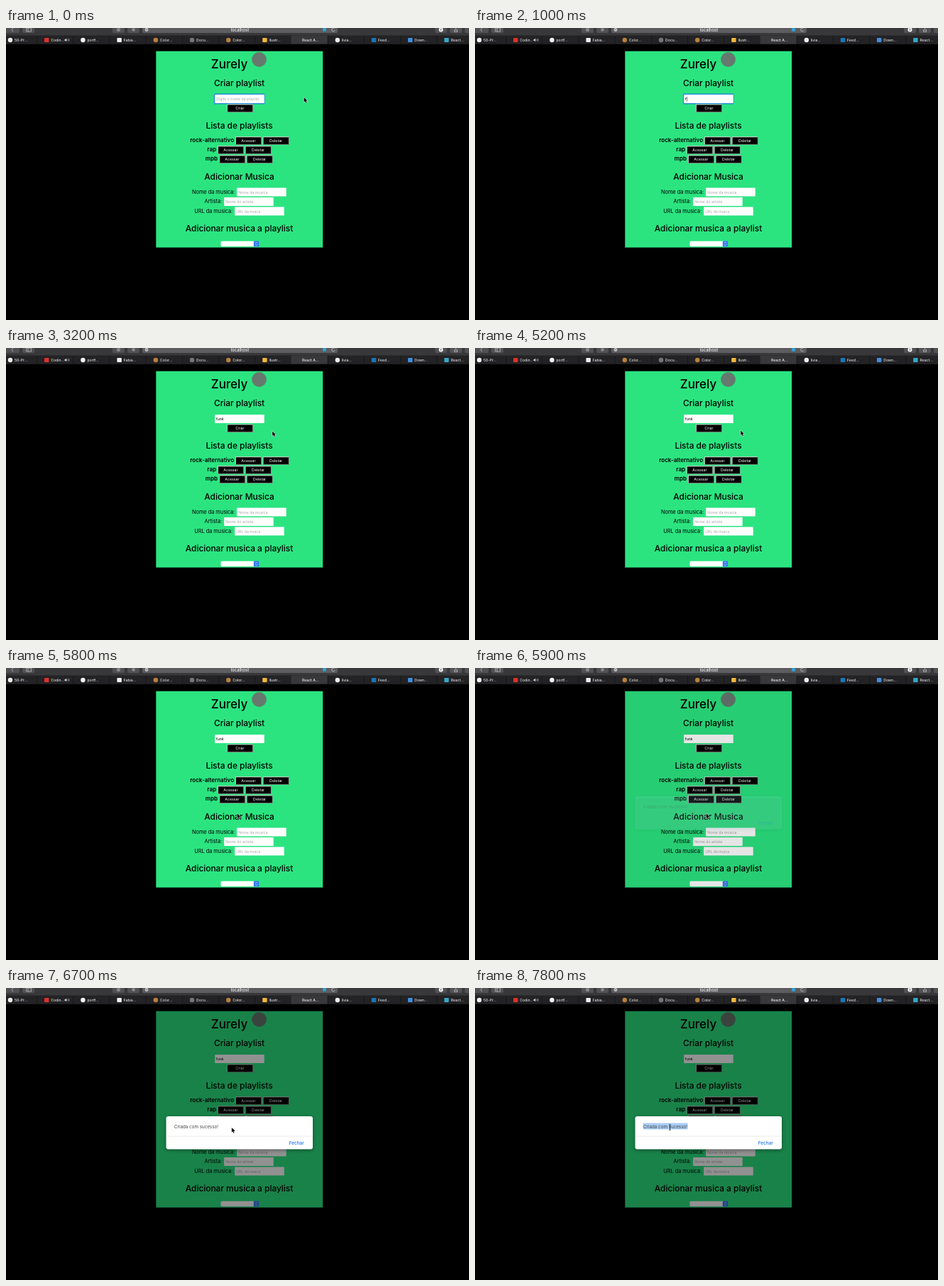
Animation of 652 by 412 pixels, one loop 8 s. Source, as an HTML page with a canvas:

```html
<!DOCTYPE html>
<html lang="pt">
<head>
<meta charset="utf-8">
<title>Playlists</title>
<style>
html, body { margin: 0; width: 100%; height: 100%; overflow: hidden; background: #000; }
canvas { display: block; width: 652px; height: 412px; }
</style>
</head>
<body>
<canvas id="stage"></canvas>
<script>
const W = 652, H = 412, LOOP = 8000, STEP = 100;
const MID = 328.5;
const TAB_W = 51.2;
const FONT = 'Inter, "Liberation Sans", sans-serif';
const canvas = document.getElementById('stage');
const ctx = canvas.getContext('2d');
const dpr = window.devicePixelRatio || 1;
canvas.width = W * dpr;
canvas.height = H * dpr;

function rect(x, y, w, h, color) {
  ctx.fillStyle = color;
  ctx.fillRect(x, y, w, h);
}

function round(x, y, w, h, r, color) {
  ctx.fillStyle = color;
  ctx.beginPath();
  ctx.roundRect(x, y, w, h, r);
  ctx.fill();
}

function disc(x, y, r, color) {
  ctx.fillStyle = color;
  ctx.beginPath();
  ctx.arc(x, y, r, 0, Math.PI * 2);
  ctx.fill();
}

function text(str, x, y, size, color = '#000', weight = 400, align = 'left') {
  ctx.font = `${weight} ${size}px ${FONT}`;
  ctx.textAlign = align;
  ctx.fillStyle = color;
  ctx.fillText(str, x, y);
}

function line(points, color, width = 0.8) {
  ctx.strokeStyle = color;
  ctx.lineWidth = width;
  ctx.beginPath();
  points.forEach(([x, y]) => ctx.lineTo(x, y));
  ctx.stroke();
}

// Interpolates through [time, x, y] keys, easing each leg.
function along(keys, t) {
  let i = 0;
  while (i < keys.length - 2 && t >= keys[i + 1][0]) i++;
  const [t0, x0, y0] = keys[i], [t1, x1, y1] = keys[i + 1];
  const p = Math.min(1, Math.max(0, (t - t0) / (t1 - t0)));
  const e = p * p * (3 - 2 * p);
  return [x0 + (x1 - x0) * e, y0 + (y1 - y0) * e];
}

// icon shape, icon colour, label
const tabs = [
  ['disc', '#f2f2f2', '50-Pr...'],
  ['square', '#e0302c', 'Codin...'],
  ['disc', '#f2f2f2', 'portf...'],
  ['square', '#f4f4f4', 'Fabia...'],
  ['disc', '#b8813f', 'Color...'],
  ['disc', '#77777a', 'Docu...'],
  ['disc', '#b8813f', 'Color...'],
  ['square', '#f3b83a', 'Ilustr...'],
  null,
  ['disc', '#f2f2f2', 'livia...'],
  ['square', '#1b77b8', 'Feed...'],
  ['square', '#3f8fe0', 'Down...'],
  ['square', '#37a9c9', 'React...']
];

function drawBrowser() {
  const icon = '#c4c4c6', key = '#525154';
  rect(0, 0, W, 11, '#38373a');
  round(-5, -4, 24, 11, 2, key);
  [23, 150, 171, 604, 625, 646].forEach(x => round(x, -4, 17, 11, 2, key));
  round(192, -4, 275, 11, 2, '#5d5c5f');

  line([[10, 0], [7.8, 2.5], [10, 5]], icon);
  ctx.strokeStyle = icon;
  ctx.lineWidth = 0.7;
  ctx.strokeRect(28.5, 0, 7, 5);
  line([[31, 0], [31, 5]], icon);
  disc(158.5, 2.5, 2.6, '#858487');
  disc(179.5, 2.5, 2.4, '#858487');
  disc(198, 2.5, 2.4, icon);
  line([[196.8, 2.5], [199.2, 2.5]], '#5d5c5f', 0.6);
  text('localhost', 329.5, 5, 5.8, '#f4f4f4', 500, 'center');
  round(446, 0, 5, 4.8, 1, '#2f9fd0');
  ctx.strokeStyle = icon;
  ctx.lineWidth = 0.8;
  ctx.beginPath();
  ctx.arc(460.8, 2.5, 2.2, 0.3, 5.4);
  ctx.stroke();
  disc(612.5, 2.4, 3, '#f0f0f0');
  line([[612.5, 0.8], [612.5, 3.9]], key);
  line([[631.5, 2], [631.5, 5.2], [635.5, 5.2], [635.5, 2]], icon);
  line([[633.5, 0], [633.5, 3.7]], icon);

  rect(0, 10.5, W, 12.5, '#232225');
  tabs.forEach((tab, i) => {
    const left = i * TAB_W - 8;
    if (!tab) {
      rect(left, 10.5, TAB_W, 12.5, '#38373a');
      text('React A...', 428.7, 18.8, 5.1, '#f0f0f0', 500, 'center');
      return;
    }
    const [shape, color, label] = tab;
    const x = left + 14;
    rect(left, 11, 0.6, 12, '#111');
    if (shape === 'disc') disc(x, 17, 3.2, color);
    else round(x - 3.2, 13.9, 6.4, 6.2, 0.8, color);
    text(label, x + 6, 18.8, 5.1, '#dedede', 500);
  });
  ctx.fillStyle = '#d0d0d0';
  ctx.beginPath();
  [[82.5, 15.9], [83.7, 15.9], [85.3, 14.5], [85.3, 19.3], [83.7, 17.9], [82.5, 17.9]]
    .forEach(p => ctx.lineTo(...p));
  ctx.fill();
  line([[86.8, 15.5], [87.2, 16.9], [86.8, 18.3]], '#d0d0d0', 0.6);
  line([[88.3, 14.8], [88.9, 16.9], [88.3, 19]], '#d0d0d0', 0.6);
  rect(0, 22.6, W, 0.7, '#111');
}

function button(label, x, y) {
  rect(x, y, 37, 11.5, '#7f9488');
  rect(x, y, 36.2, 10.7, '#e4ece7');
  rect(x + 0.8, y + 0.8, 35.4, 9.9, '#000');
  text(label, x + 18.4, y + 7.4, 5.3, '#fff', 400, 'center');
}

function field(x, y, hint) {
  rect(x, y, 69.5, 12, '#fff');
  if (hint) text(hint, x + 2, y + 8.3, 5.2, '#a6a6a6');
}

const heading = (str, y) => text(str, MID, y, 11.9, '#000', 500, 'center');

function drawPage(t) {
  rect(211.3, 32.7, 234.8, 277, '#2be480');
  text('Zurely', 314.5, 57, 17, '#000', 500, 'center');
  disc(356.5, 44.5, 10.4, '#66786f');

  heading('Criar playlist', 81.5);
  if (t < 2800) round(292.8, 92.5, 71.8, 14.9, 1.5, '#2b8fd8');
  const typed = t < 900 ? '' : 'funk'.slice(0, t < 1200 ? 1 : Math.floor((t - 1200) / 100) + 2);
  field(294.2, 94, typed ? '' : 'Digite o nome da playlist');
  if (typed) {
    text(typed, 295.8, 102.1, 5.2);
    if (t < 1900) rect(296.2 + ctx.measureText(typed).width, 97, 0.6, 6.4, '#222');
  }
  button('Criar', 311, 107.6);

  heading('Lista de playlists', 141.5);
  [['rock-alternativo', 323], ['rap', 298], ['mpb', 300]].forEach(([name, x], i) => {
    const y = 153.4 + i * 13.1;
    text(name, x - 2, y + 7.8, 8, '#000', 600, 'right');
    button('Acessar', x, y);
    button('Deletar', x + 38.7, y);
  });

  heading('Adicionar Musica', 213.7);
  [
    ['Nome da musica:', 325.2, 'Nome da musica'],
    ['Artista:', 307.2, 'Nome do artista'],
    ['URL da musica:', 322.2, 'URL da muica']
  ].forEach(([label, x, hint], i) => {
    const y = 225.5 + i * 13.5;
    text(label, x - 2.9, y + 8, 7.35, '#000', 400, 'right');
    field(x, y, hint);
  });

  heading('Adicionar musica a playlist', 286.8);
  round(302.5, 300.7, 53.5, 7.6, 1.5, '#fff');
  round(348.8, 300.5, 7.4, 8, 1.3, '#2f78f0');
  line([[351, 303.6], [352.5, 302.1], [354, 303.6]], '#fff', 0.7);
  line([[351, 305.4], [352.5, 306.9], [354, 305.4]], '#fff', 0.7);
}

function drawAlert(t) {
  if (t < 5900) return;
  const opening = t < 6000;
  rect(0, 23, W, H - 23, `rgba(0,0,0,${opening ? 0.1 : 0.43})`);

  ctx.save();
  ctx.globalAlpha = opening ? 0.11 : t < 6100 ? 0.91 : 1;
  ctx.shadowColor = 'rgba(0,0,0,.4)';
  ctx.shadowBlur = 5 * dpr;
  ctx.shadowOffsetY = 1.5 * dpr;
  round(225.5, 181, 206.5, 46.5, 3.2, opening ? '#b8ffff' : '#fff');
  ctx.shadowColor = 'transparent';
  if (t >= 7000) {
    const left = Math.max(237, along(dragPath, Math.min(t, 7500))[0]);
    rect(left, 190.5, 299.5 - left, 9, '#a9cdf6');
  }
  if (opening) ctx.globalAlpha = 0.25;
  text('Criada com sucesso!', 237, 198, 6.25, '#444');
  rect(225.5, 208.8, 206.5, 0.6, opening ? 'transparent' : '#dcdcdc');
  text('Fechar', 398.8, 221, 6.4, '#1a73e8', 500);
  ctx.restore();
}

const arrowPath = [
  [0, 419.6, 97.8], [900, 419.6, 97.8], [2200, 417, 100], [2800, 338, 112], [3000, 338, 112],
  [3200, 375.2, 117.4], [5100, 375.2, 117.4], [5200, 374.2, 116.4], [5700, 325.6, 205.3],
  [5900, 325.6, 205.3], [6000, 326, 199.4], [6300, 326, 199.4], [6900, 315, 196]
];
const dragPath = [
  [7000, 300, 196], [7500, 229, 196], [7600, 229, 196], [7800, 274.5, 196.5]
];

function drawArrow(x, y) {
  ctx.beginPath();
  [[0, 0], [0, 6.7], [1.5, 5.4], [2.6, 7.9], [3.7, 7.4], [2.7, 5], [4.8, 4.9]]
    .forEach(([dx, dy]) => ctx.lineTo(x + dx, y + dy));
  ctx.closePath();
  ctx.lineJoin = 'round';
  ctx.lineWidth = 1;
  ctx.strokeStyle = '#fff';
  ctx.stroke();
  ctx.fillStyle = '#000';
  ctx.fill();
}

function drawBeam(x, y) {
  line([[x, y - 3.6], [x, y + 3.8]], '#222', 0.8);
  line([[x - 1.5, y - 4], [x, y - 3.4], [x + 1.5, y - 4]], '#222', 0.7);
  line([[x - 1.5, y + 4.2], [x, y + 3.6], [x + 1.5, y + 4.2]], '#222', 0.7);
}

function drawPointer(t) {
  if (t >= 7000) drawBeam(...along(dragPath, t));
  // The pointer hides while typing.
  else if (t < 900 || t >= 2200) drawArrow(...along(arrowPath, t));
}

function frame(now) {
  const t = Math.floor((now % LOOP) / STEP) * STEP;
  ctx.setTransform(dpr, 0, 0, dpr, 0, 0);
  rect(0, 0, W, H, '#000');
  drawBrowser();
  drawPage(t);
  drawAlert(t);
  drawPointer(t);
  requestAnimationFrame(frame);
}
requestAnimationFrame(frame);
</script>
</body>
</html>
```
